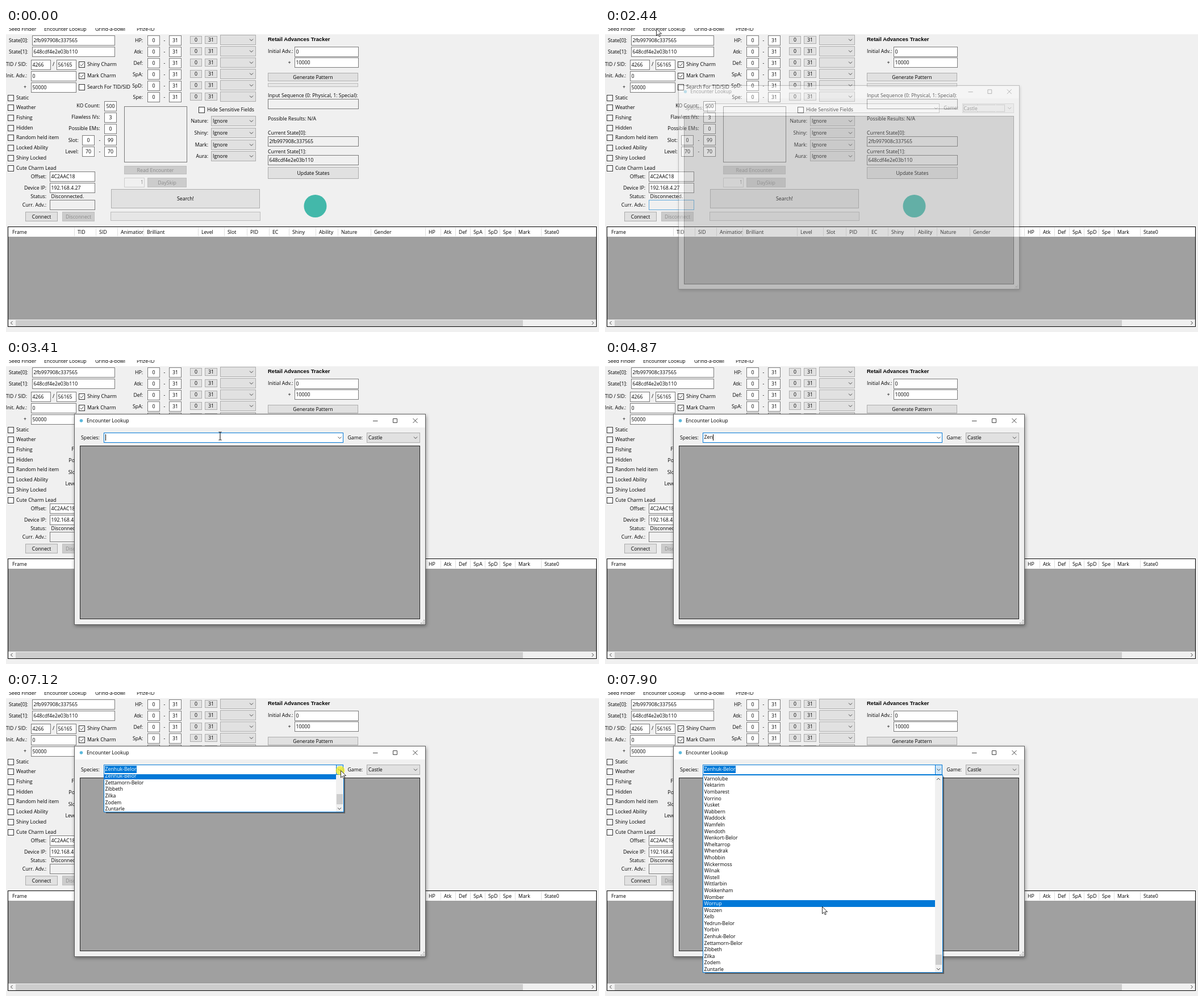
Write an HTML page that moves like this. It is 1044 by 536 pixels and loops after 7990 ms.

```html
<!DOCTYPE html>
<html lang="en">
<head>
<meta charset="utf-8">
<title>Encounter Lookup</title>
<style>
html, body { margin: 0; width: 100%; height: 100%; overflow: hidden; background: #f0f0f0; }
svg { display: block; width: 100vw; height: 100vh; }
text { font: 8.75px "Open Sans", "Noto Sans", sans-serif; white-space: pre; }
text.head { font: bold 9.5px "Liberation Sans", sans-serif; }
rect { shape-rendering: crispEdges; }
.line { fill: none; stroke: #444; }
</style>
</head>
<body>
<svg id="stage" viewBox="0 0 1044 536" xmlns="http://www.w3.org/2000/svg"></svg>
<script>
const LOOP = 7990, ROW = 11.59, LIST_H = 348, LIST_TOP = 146;
const BLUE = '#0078d7', FACE = '#f0f0f0', GRAY = '#a0a0a0', INK = '#000';

// ---- drawing helpers: y of text is its middle, boxes are left, top, right, bottom
const text = (x, y, s, anchor = 'start', fill = INK, extra = '') =>
  `<text x="${x}" y="${y + 3.1}" text-anchor="${anchor}" fill="${fill}" ${extra}>${s}</text>`;
const right = (x, y, s) => text(x, y, s, 'end');
const fillBox = (l, t, r, b, fill, extra = '') =>
  `<rect x="${l}" y="${t}" width="${r - l}" height="${b - t}" fill="${fill}" ${extra}/>`;
const box = (l, t, r, b, fill = '#fff', stroke = '#7a7a7a', extra = '') =>
  fillBox(l + .5, t + .5, r - .5, b - .5, fill, `stroke="${stroke}" ${extra}`);
const field = (l, t, r, s = '', fill = '#fff', extra = '') =>
  box(l, t, r, t + 18, fill, '#7a7a7a', extra) + text(l + 2.5, t + 8.5, s);
const num = (l, t, r, s) => box(l, t, r, t + 18) + text((l + r) / 2, t + 8.7, s, 'middle');
const button = (l, t, r, b, s, off) =>
  box(l, t, r, b, off ? '#ccc' : '#e1e1e1', off ? '#bfbfbf' : '#adadad') +
  text((l + r) / 2, (t + b) / 2, s, 'middle', off ? '#8a8a8a' : INK);
const chevron = (x, y, dir = 1) =>
  `<path class="line" d="M${x - 3} ${y - 1.5 * dir}l3 ${3 * dir}l3 ${-3 * dir}"/>`;
const combo = (l, t, r, b, s) =>
  box(l, t, r, b, '#e1e1e1', '#adadad') + text(l + 3, (t + b) / 2 + .2, s) + chevron(r - 8, (t + b) / 2);
const check = (x, y, s, on) => box(x, y - 5, x + 11, y + 6, '#fff', '#333') +
  (on ? `<path class="line" d="M${x + 2.5} ${y + .5}l2.2 2.4l4 -5"/>` : '') + text(x + 15, y + .3, s);

// ---- main window
function mainWindow() {
  let o = fillBox(0, 0, 1044, 536, FACE) + fillBox(0, 0, 1044, 11, '#fff');
  o += box(60, -8, 150, 9, '#b3d7f3', BLUE, 'id="menuHot"');
  [[5, 'Seed Finder'], [67, 'Encounter Lookup'], [157, 'Grind-a-bowl'], [230, 'Prize-ID']]
    .forEach(([x, s]) => o += text(x, 1.8, s));

  o += text(5, 21.4, 'State[0]:') + text(5, 42, 'State[1]:');
  o += field(46, 13, 192, '2fb997908c337565', '#fff', 'id="state0"');
  o += field(46, 33, 192, '648cdf4e2e03b110', '#fff', 'id="state1"');
  o += right(37, 64, 'TID / SID:') + field(44, 56, 79, '4266') + text(82, 64, '/') + field(89, 56, 124, '56165');
  o += right(37, 84, 'Init. Adv.:') + field(44, 76, 124, '0');
  o += text(31, 104, '+') + field(44, 96, 124, '50000');
  o += check(128, 64, 'Shiny Charm', 1) + check(128, 84, 'Mark Charm', 1) + check(128, 104, 'Search For TID/SID');
  ['Static', 'Weather', 'Fishing', 'Hidden', 'Random held item', 'Locked Ability', 'Shiny Locked', 'Cute Charm Lead']
    .forEach((s, i) => o += check(3, Math.round(122.6 + 17.7 * i), s));

  [['KO Count:', 500], ['Flawless IVs:', 3], ['Possible EMs:', 0]].forEach(([s, v], i) => {
    const y = 137 + 20 * i;
    o += right(165.5, y, s) + num(173, y - 8, 195, v);
  });
  [['Slot:', 0, 99], ['Level:', 70, 70]].forEach(([s, a, b], i) => {
    const y = 197.5 + 20 * i, t = 189 + 20 * i;
    o += right(127.5, y, s) + num(134, t, 156, a) + text(165, y, '-', 'middle') + num(173, t, 195, b);
  });

  o += right(71, 262, 'Offset:') + field(77, 253, 157, '4C2AAC18');
  o += right(71, 281.5, 'Device IP:') + field(77, 273, 157, '192.168.4.27');
  o += right(71, 297, 'Status:') + text(79.5, 297, 'Disconnected.');
  o += right(71, 312, 'Curr. Adv.:') + field(77, 303, 157, '', FACE, 'id="adv"');
  o += button(34, 324, 91, 341, 'Connect') + button(99, 324, 156, 341, 'Disconnect', 1);

  ['HP:', 'Atk:', 'Def:', 'SpA:', 'SpD:', 'Spe:'].forEach((s, i) => {
    const y = Math.round(21.6 + 20.05 * i);
    o += right(241, y - .5, s) + num(249, y - 9, 271, 0) + text(279, y - .5, '-', 'middle') + num(287, y - 9, 309, 31);
    o += button(324, y - 8, 345, y + 6, 0) + button(350, y - 8, 372, y + 6, 31) + combo(377, y - 10, 440, y + 8, '');
  });
  o += box(208, 138, 319, 237, FACE, '#7a7a7a', 'id="notes"');
  o += button(208, 243, 318, 258, 'Read Encounter', 1);
  o += box(208, 264, 244, 281, FACE, '#ccc') + text(242, 272.3, '1', 'end', '#8a8a8a');
  o += button(249, 264, 318, 281, 'DaySkip', 1) + button(185, 284, 447, 318, 'Search!');
  o += box(184, 324, 448, 340, '#e6e6e6', '#bcbcbc');
  o += check(339, 144, 'Hide Sensitive Fields');
  ['Nature:', 'Shiny:', 'Mark:', 'Aura:'].forEach((s, i) => {
    const y = Math.round(164 + 20.8 * i);
    o += right(356, y, s) + combo(361, y - 9, 440, y + 9, 'Ignore');
  });

  o += text(461, 20.3, 'Retail Advances Tracker', 'start', INK, 'class="head"');
  o += text(461, 41, 'Initial Adv.:') + field(508, 33, 621, '0');
  o += text(496.5, 61, '+') + field(508, 52, 621, '10000');
  o += button(461, 79, 620, 94, 'Generate Pattern') + box(461, 97, 620, 104, '#e6e6e6', '#bcbcbc');
  o += text(461, 119, 'Input Sequence (0: Physical, 1: Special):') + field(461, 125, 621, '', FACE);
  o += text(461, 160, 'Possible Results: N/A');
  o += text(461, 184.5, 'Current State[0]:') + field(461, 191, 621, '2fb997908c337565', FACE);
  o += text(461, 217.5, 'Current State[1]:') + field(461, 224, 621, '648cdf4e2e03b110', FACE);
  o += button(461, 245, 621, 266, 'Update States');
  o += '<circle cx="544.5" cy="314" r="20" fill="#43b8aa"/>';
  return o + table();
}

function table() {
  let o = box(3, 350, 1040, 527, GRAY, INK) + fillBox(4, 351, 1039, 367.5, '#fff');
  const cols = 'Frame 11 TID 126 SID 164 Animation 202 Brilliant 248 Level 344 Slot 390 PID 430 EC 469 Shiny 504 Ability 551 ' +
    'Nature 590 Gender 648 HP 744 Atk 771 Def 797 SpA 823 SpD 849 Spe 875 Mark 902 State0 948';
  for (const [, s, x] of cols.matchAll(/(\w+) (\d+)/g)) {
    o += text(+x, 359.7, s, 'start', INK, s === 'Animation' ? 'clip-path="url(#cell)"' : '');
    if (x > 11) o += fillBox(x - 6, 352, x - 5, 367, '#dedede');
  }
  o += fillBox(4, 514, 1039, 526, FACE) + fillBox(17, 514.5, 910, 525.5, '#cdcdcd');
  return o + '<path class="line" d="M11.5 517l-3 3l3 3M1031.500 517l3 3l-3 3"/>';
}

// ---- lookup dialog
function dialog() {
  let o = fillBox(121, 98, 740, 469, '#0006', 'style="filter:blur(3px)"');
  o += box(120, 95, 739, 467, FACE, '#5c5c5c') + fillBox(121, 96, 738, 119, '#fff');
  o += '<circle cx="132.500" cy="107" r="2.8" fill="#5bb9dc"/>' + text(142, 107, 'Encounter Lookup');
  o += '<path class="line" d="M646 107.500h8.500M681.500 103.500h7v7h-7zM716.500 103l8 8M724.500 103l-8 8"/>';
  o += text(132, 136.7, 'Species:') + box(172, 128, 594, 146, '#fff', '#7a7a7a', 'id="species"');
  o += box(581, 128, 594, 146, '#cce4f7', BLUE, 'id="hotButton"') + chevron(587.5, 137);
  o += fillBox(174, 130, 230, 143, BLUE, 'id="picked"') + text(174.5, 136.3, '', 'start', INK, 'id="typed"');
  o += fillBox(175, 130.5, 176, 142, INK, 'id="caret"');
  o += text(601.5, 136.7, 'Game:') + combo(635, 128, 729, 146, 'Castle');
  o += box(637, 130, 712, 144, 'none', '#333', 'stroke-dasharray="1 1" id="focus"');
  o += box(130, 151, 729, 457, GRAY, '#222');
  for (let i = 0; i < 3; i++)
    for (let j = 0; j < 3 - i; j++)
      o += fillBox(735 - 2.5 * i, 463 - 2.5 * j, 736.5 - 2.5 * i, 464.5 - 2.5 * j, '#aaa');
  return o;
}

const names = ('Varnolube Vektarim Vombarest Vorrino Vusket Wabbern Waddock Wamfeln Wendoth Wenkort-Belor Wheltarrop ' +
  'Whendrak Whobbin Wickermoss Wilnak Wistell Wittlarbin Wokkenham Womber Worrup Wozzen Xelb Yedrun-Belor Yorbin ' +
  'Zenhuk-Belor Zettamorn-Belor Zibbeth Zilka Zodem Zuntarle').split(' ');
const CHOSEN = names.indexOf('Zenhuk-Belor');

function dropList() {
  let o = fillBox(176, 149, 597, 150, '#0006', 'id="listShade"') + box(172, LIST_TOP, 595, 160, '#fff', BLUE, 'id="listFrame"');
  o += '<g clip-path="url(#listClip)"><g id="rows">' + fillBox(173, 0, 581, ROW, BLUE, 'id="rowHot"');
  names.forEach((s, i) => o += text(174.5, 152.8 + ROW * i, s, 'start', INK, 'class="row"'));
  o += fillBox(581, 147, 594, 494, FACE) + fillBox(581.5, 463, 593, 481, '#cdcdcd');
  return o + chevron(587, 153.5, -1) + chevron(587, 488.5) + '</g></g>';
}

const stage = document.getElementById('stage');
stage.innerHTML =
  `<defs><clipPath id="cell">${fillBox(197, 351, 242, 368, INK)}</clipPath>
  <clipPath id="listClip">${fillBox(173, LIST_TOP, 594, 160, INK, 'id="listHole"')}</clipPath></defs>
  ${mainWindow()}<g id="dialog">${dialog()}</g><g id="list">${dropList()}</g>
  <circle id="click" r="8" fill="#fff000" fill-opacity=".65"/>
  <path id="arrow" d="M0 0V12.500L2.900 9.800L4.800 14.200L6.800 13.400L4.900 9.100H9Z" fill="#fff" stroke="#000" stroke-width=".8"/>
  <path id="beam" d="M-2.500 -7H-.5L0 -6.500L.5 -7H2.500M0 -6.500V6.500M-2.500 7H-.5L0 6.500L.5 7H2.500" fill="none" stroke="#000"/>`;
const el = {};
stage.querySelectorAll('[id]').forEach(n => el[n.id] = n);
const rowTexts = [...stage.querySelectorAll('.row')];

// ---- timeline: pointer holds at [ms, x, y], text holds at [ms, value]
const pointer = [[0, -50, -50],
  [120, 982, 521], [195, 770, 418], [270, 565, 319], [500, 450, 255], [580, 310, 165], [660, 236, 95],
  [810, 185, 62], [890, 150, 44], [960, 128, 34], [1040, 118, 28], [1200, 108, 20], [1280, 101, 13.5],
  [1370, 91.5, 0], [1660, 91.5, -2], [1830, 90.5, 1],
  [2690, 140, 18], [2770, 260, 45], [2850, 410, 80], [2930, 550, 108], [3010, 660, 126], [3090, 704, 131],
  [3240, 640, 131], [3320, 480, 130], [3410, 377, 134], [4320, -50, -50],
  [6040, 470, 112], [6115, 590, 88], [6190, 648.5, 78.5], [6270, 668, 69], [6350, 673, 67], [6420, 660, 85],
  [6500, 640, 108], [6580, 622, 126], [6650, 608, 136], [6730, 600, 139], [6880, 595, 138], [6960, 589.5, 138.5],
  [7430, 575, 170], [7510, 520, 250], [7590, 440, 330], [7670, 390, 373], [7830, 385, 376], [7900, 382.5, 378.5]];
const typing = [[0, ''], [3410, ''], [4320, 'Z'], [4790, 'Ze'], [4870, 'Zen'], [5110, 'Zenu'], [5420, 'Zen'],
  [5490, 'Zenh'], [5570, 'Zenhu'], [5720, 'Zenhuk'], [7040, 'Zenhuk-Belor']];
const opening = [[0, 1, 0], [2440, .97, .35], [2530, .988, .8], [2610, 1, 1]];

const held = (keys, t) => keys.findLast(k => k[0] <= t) || keys[0];
const between = (t, a, b) => t >= a && t < b;
const show = (n, on) => n.setAttribute('visibility', on ? 'visible' : 'hidden');
const put = (n, attrs) => { for (const k in attrs) n.setAttribute(k, attrs[k]); };
const inside = (t, l, top, r, b) => {
  const [, x, y] = held(pointer, t);
  return x >= l && x < r && y >= top && y < b;
};
const hover = (n, t, ...area) =>
  n.setAttribute('stroke', inside(t, ...area) || inside(t - 140, ...area) ? '#171717' : '#7a7a7a');

function drawDialog(t) {
  const [, scale, alpha] = held(opening, t);
  put(el.dialog, { display: alpha ? 'inline' : 'none', opacity: alpha,
    transform: `translate(429.5 281) scale(${scale}) translate(-429.5 -281)` });
  put(el.species, { stroke: t < 3240 ? '#7a7a7a' : BLUE });
  show(el.focus, t < 3240);
  show(el.hotButton, t >= 6880);

  const [since, value] = held(typing, t), picked = t >= 7040;
  el.typed.textContent = value;
  put(el.typed, { fill: picked ? '#fff' : INK });
  const width = value ? el.typed.getComputedTextLength() : 0;
  show(el.picked, picked);
  put(el.picked, { width: width + 1 });
  put(el.caret, { x: Math.round(174.5 + width) });
  show(el.caret, t >= 3410 && !picked && (t - since) % 1060 < 530);
}

function drawList(t, x, y) {
  const step = t < 7200 ? 7120 : t < 7290 ? 7200 : 7290;
  const h = Math.min(LIST_H, (step - 7083) * 1.76);
  put(el.list, { display: t < 7120 ? 'none' : 'inline' });
  [el.listHole, el.listFrame, el.listShade].forEach(n => put(n, { height: h }));
  put(el.rows, { transform: `translate(0 ${h - LIST_H})` });
  const over = t >= 7430 && x < 581 && y > LIST_TOP;
  const hot = over ? Math.floor((y - 147.2) / ROW) : CHOSEN;
  put(el.rowHot, { y: 147.2 + hot * ROW });
  rowTexts.forEach((n, i) => n.setAttribute('fill', i === hot ? '#fff' : INK));
}

function draw(t) {
  const [, x, y] = held(pointer, t);
  hover(el.state0, t, 46, 13, 192, 32);
  hover(el.state1, t, 46, 32, 192, 51);
  hover(el.notes, t, 208, 138, 319, 237);
  show(el.menuHot, between(t, 1830, 2440));
  put(el.adv, { stroke: between(t, 2140, 2610) ? '#5fa8dc' : '#7a7a7a' });
  drawDialog(t);
  drawList(t, x, y);

  const onText = t < 2440
    ? inside(t, 46, 13, 192, 51) || inside(t, 208, 138, 319, 237)
    : inside(t, 172, 128, 581, 146);
  const at = `translate(${x} ${y})`;
  put(el.arrow, { transform: at });
  put(el.beam, { transform: at });
  put(el.click, { cx: x - 1, cy: y });
  show(el.arrow, !onText);
  show(el.beam, onText);
  show(el.click, between(t, 2140, 2440) || between(t, 7040, 7200));
}

const start = performance.now();
function tick(now) {
  draw(Math.max(0, now - start) % LOOP);
  requestAnimationFrame(tick);
}
draw(0);
requestAnimationFrame(tick);
</script>
</body>
</html>
```
